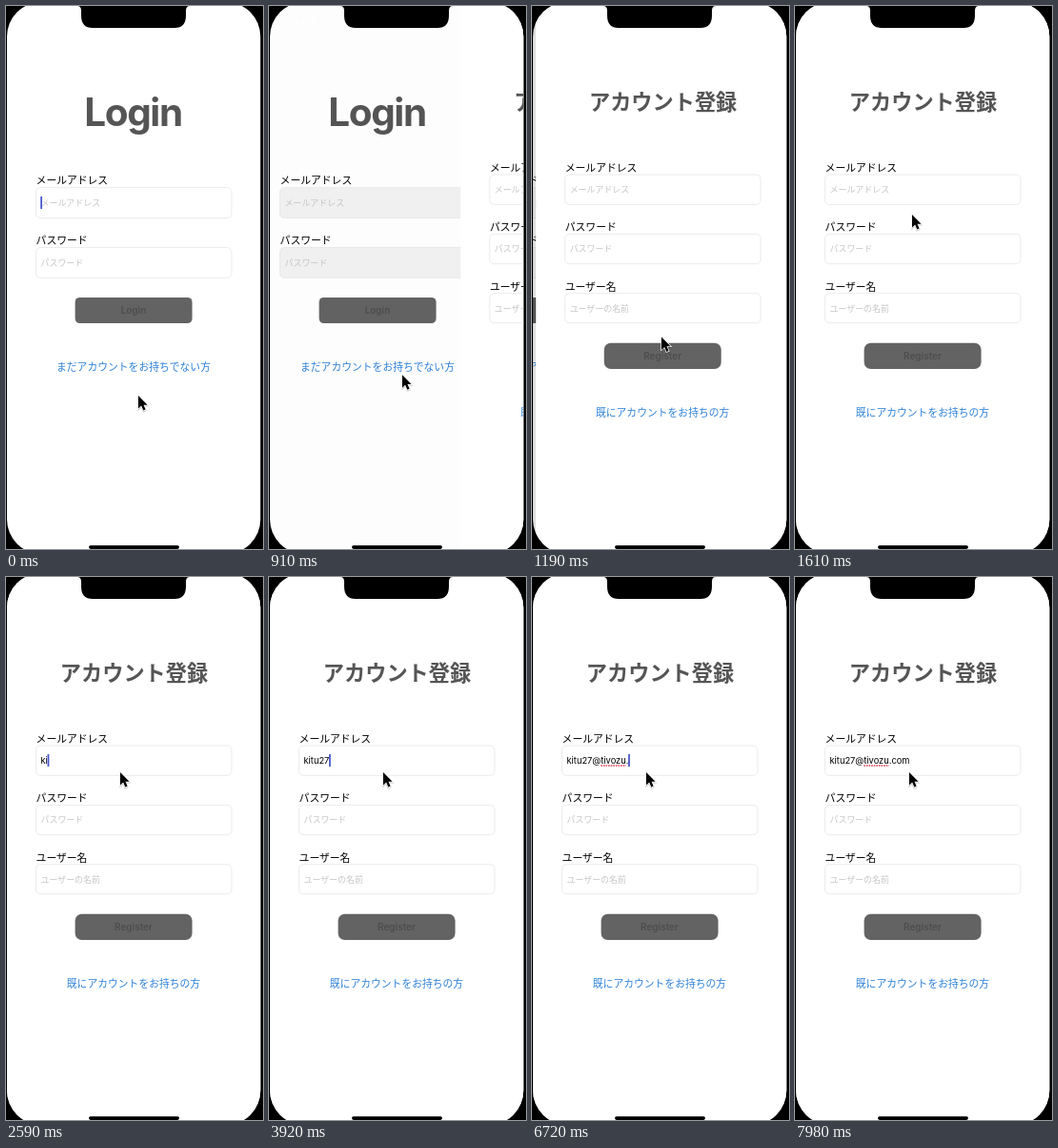
Write an HTML page that moves like this. It is 270 by 570 pixels and loops after 8 s.

```html
<!DOCTYPE html>
<html lang="ja">
<head>
<meta charset="utf-8">
<style>
  html, body { margin: 0; width: 100%; height: 100%; overflow: hidden; background: #000; }
  svg { display: block; width: 270px; height: 570px; }
  text { font-family: Inter, "Noto Sans CJK JP", "Noto Sans CJK", sans-serif; white-space: pre; }
  .jp { font-family: "Noto Sans CJK JP", "Noto Sans CJK", sans-serif; }
  .mid { text-anchor: middle; }
  .title { font-weight: 700; fill: #555; }
  .label { font-size: 10.8px; fill: #000; }
  .hint { font-size: 8.95px; fill: #c6c6c6; }
  .link { font-size: 10.8px; fill: #2f82d8; }
  .button { font-size: 10px; font-weight: 600; fill: #4e4e4e; }
  .typed { font-size: 9.3px; fill: #000; }
  .caret { fill: #4a58cc; }
</style>
</head>
<body>
<svg viewBox="0 0 270 570">
  <clipPath id="screen"><rect x="1" y="-4" width="266.3" height="579" rx="36"/></clipPath>
  <rect width="270" height="570"/>
  <g clip-path="url(#screen)">
    <rect width="270" height="570" fill="#fff"/>
    <g id="login"></g>
    <rect id="dim" width="270" height="570"/>
    <text x="25" y="21" font-size="10" font-weight="600" fill="#fff">3:09</text>
    <g id="register"></g>
  </g>
  <path d="M75 0Q79 0 79 5V10Q79 23 91 23H177Q189 23 189 10V5Q189 0 193 0Z"/>
  <rect x="87" y="566.3" width="95" height="3.6" rx="1.8"/>
  <g id="cursor">
    <path d="M0 1V14.5L3.2 11.6L5.3 16.6L7.6 15.6L5.5 10.8H9.6Z" opacity=".2" stroke="#000" stroke-width="1.6"/>
    <path d="M0 0V13.5L3.2 10.6L5.3 15.6L7.6 14.6L5.5 9.8H9.6Z" stroke="#fff" stroke-width="1.4" paint-order="stroke"/>
  </g>
</svg>
<script>
const LOOP = 8000, STEP = 70, WIDTH = 267;
const $ = id => document.getElementById(id);

const label = (y, s) => `<text class="jp label" x="31.6" y="${y + 4.1}">${s}</text>`;
const field = (y, h, hint, id = '') =>
  `<rect class="field" x="31.5" y="${y}" width="205.5" height="${h}" rx="4.5" fill="#000" fill-opacity="0" stroke="#e6e6e6" stroke-width=".8"/>
   <text class="jp hint" ${id && `id="${id}"`} x="36.5" y="${y + h / 2 + 3.4}">${hint}</text>`;
const button = (y, r, s) =>
  `<rect x="72.6" y="${y}" width="123" height="27.2" rx="${r}" fill="#636363"/>
   <text class="button mid" x="134" y="${y + 17.3}">${s}</text>`;
const link = (y, s) => `<text class="jp link mid" x="134" y="${y + 4.1}">${s}</text>`;
const caret = (id, y) => `<rect class="caret" id="${id}" x="36.2" y="${y}" width="1.8" height="13"/>`;

$('login').innerHTML =
  `<text class="title mid" x="133.5" y="125.5" font-size="40.5" letter-spacing="-1.4">Login</text>` +
  label(183, 'メールアドレス') + field(190.7, 31.8, 'メールアドレス') +
  label(246, 'パスワード') + field(253.5, 31.8, 'パスワード') +
  button(305.9, 5, 'Login') + link(379, 'まだアカウントをお持ちでない方') + caret('loginCaret', 200);

$('register').innerHTML =
  `<rect x="1" width="270" height="570" fill="#fff"/>
   <text class="jp title mid" x="134.5" y="109.4" font-size="22.2">アカウント登録</text>` +
  label(170, 'メールアドレス') + field(177, 31.3, 'メールアドレス', 'mailHint') +
  label(232, 'パスワード') + field(239.4, 31.3, 'パスワード') +
  label(295, 'ユーザー名') + field(301.7, 31, 'ユーザーの名前') +
  button(353.8, 7, 'Register') + link(427, '既にアカウントをお持ちの方') +
  `<text class="typed" id="mail" x="36.5" y="195.7"></text>
   <path id="squiggle" stroke="#e0364a" stroke-width="1.6" stroke-dasharray="1.6 1"/>` +
  caret('mailCaret', 186);

const address = 'kitu27@tivozu.com';
const keyTimes = [2520, 2590, 3080, 3290, 3780, 3920, 4410, 4620, 5600,
  5810, 6020, 6160, 6300, 6720, 6930, 7140, 7280];
const spellTime = 6720;
const loginBlink = [[0, 1], [350, .5], [420, 0], [560, .5], [630, 1], [770, 0]];
const mailBlink = [[0, 0], [2100, 1], [5250, .5], [5320, 0], [5600, 1], [7840, .6], [7910, .3], [7980, 0]];
const cursorPath = [[0, 139, 409], [140, 140, 388], [1120, 140, 387], [1400, 124, 229],
  [1540, 124, 229], [1610, 123, 219], [1820, 120, 205], [LOOP, 120, 205]];

const held = (keys, t) => keys.filter(k => k[0] <= t).pop()[1];

function along(keys, t) {
  const i = keys.findIndex(k => k[0] > t);
  const [a, b] = [keys[i - 1], keys[i]];
  const u = (t - a[0]) / (b[0] - a[0]);
  return [a[1] + (b[1] - a[1]) * u, a[2] + (b[2] - a[2]) * u];
}

// Critically damped push transition.
function pushed(t) {
  if (t >= 1400) return 1;
  const w = Math.max(0, t - 861) * .0196;
  return 1 - (1 + w) * Math.exp(-w);
}

const move = (id, x, y = 0) => $(id).setAttribute('transform', `translate(${x} ${y})`);

function draw(time) {
  const t = Math.floor(time / STEP) * STEP;
  const p = pushed(t);
  move('login', -.3 * WIDTH * p);
  move('register', WIDTH * (1 - p));
  $('dim').setAttribute('opacity', .12 * p * p);
  const tint = p > 0 ? .06 * (1 - p / 2) : 0;
  document.querySelectorAll('#login .field').forEach(f => f.setAttribute('fill-opacity', tint));
  move('cursor', ...along(cursorPath, t));

  const count = keyTimes.filter(k => k <= t).length;
  const mail = $('mail');
  mail.textContent = address.slice(0, count);
  const end = count ? mail.getComputedTextLength() : 0;
  $('mailHint').setAttribute('opacity', count ? 0 : 1);
  $('mailCaret').setAttribute('x', 36.2 + end);
  $('mailCaret').setAttribute('opacity', held(mailBlink, t));
  $('loginCaret').setAttribute('opacity', held(loginBlink, t));

  const spelled = t >= spellTime;
  $('squiggle').setAttribute('opacity', spelled ? 1 : 0);
  if (spelled) {
    const from = 36.5 + mail.getSubStringLength(0, 7);
    const to = 36.5 + mail.getSubStringLength(0, 13);
    $('squiggle').setAttribute('d', `M${from} 198H${to}`);
  }
}

const start = performance.now();
function tick() {
  draw((performance.now() - start) % LOOP);
  requestAnimationFrame(tick);
}
tick();
</script>
</body>
</html>
```
